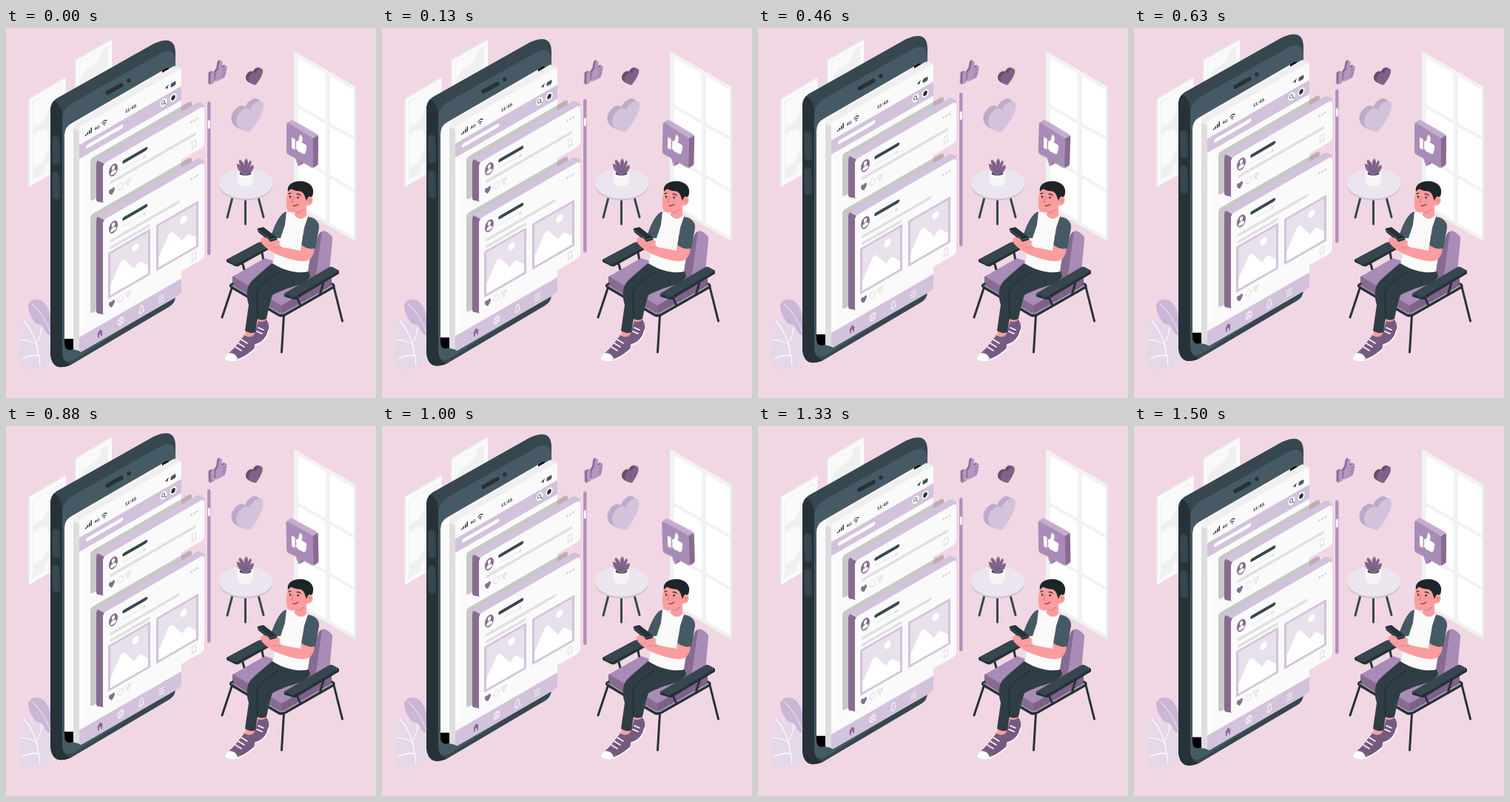
An HTML page that plays this animation: 500x500 px, repeating every 1540 ms.

```html
<!DOCTYPE html>
<html lang="en">
<head>
<meta charset="utf-8">
<title>Social feed</title>
<style>
html, body { margin: 0; width: 100%; height: 100%; overflow: hidden; background: #f1d7e3; }
svg { display: block; width: 100%; height: 100%; }
text { font-family: "Liberation Sans", Arial, sans-serif; font-weight: bold; fill: #263238; }
.float, .bar, .wind { animation: 1540ms linear -60ms infinite; }
.float { animation-name: float; }
.bar { animation-name: bar; }
.wind { animation-name: wind; transform-box: fill-box; transform-origin: center; }
@keyframes float { 0%, 100% { transform: translateY(.8px); } 50% { transform: translateY(-9.2px); } }
@keyframes bar { 0%, 100% { transform: translateY(1.6px); } 50% { transform: translateY(-18.4px); } }
@keyframes wind { 0%, 100% { transform: rotate(0); } 25% { transform: rotate(2.5deg); } 75% { transform: rotate(-2.5deg); } }
.line { fill: none; stroke-linecap: round; stroke-linejoin: round; }
.dark { fill: #263238; }
.slate { fill: #37474f; }
.steel { fill: #455a64; }
.plum { fill: #876b91; }
.mauve { fill: #a98bb7; }
.lilac { fill: #d3c2dc; }
.paper { fill: #fafafa; }
.skin { fill: #fb9d9e; }
</style>
</head>
<body>
<svg viewBox="0 0 500 500">
<defs>
  <path id="heart" d="M0 9C-14 0-10-10-4-9C-1-9 0-6 0-5C0-6 1-9 4-9C10-10 14 0 0 9Z"/>
  <path id="thumb" d="M0 8.500H5V21H0ZM6.500 10.500L10 8L11.500 1.500Q12-.5 14 .5Q16 2 15.500 5L14.500 8.500H20Q22.500 9.500 21 12Q22 14 20.500 15.500Q21 17.500 19.500 18.500Q19 21 17 21H10L6.500 19.500Z"/>
  <g id="head">
    <ellipse class="plum" cx="14" cy="16" rx="6" ry="8"/>
    <ellipse fill="#fff" cx="14" cy="13" rx="2.200" ry="2.900"/>
    <path fill="#fff" d="M10 20.500Q10 16.500 14 16.500Q18 16.500 18 20.500Q14 23.500 10 20.500Z"/>
    <path class="line" stroke="#37474f" stroke-width="4.500" d="M28.500 13H58"/>
    <path class="line" stroke="#e4e4e4" d="M27 22.500H52"/>
    <circle cx="56" cy="22.500" r="2" fill="#e0e0e0"/>
    <g fill="#d2d2d2"><circle cx="119.500" cy="12" r="1.400"/><circle cx="123.500" cy="12" r="1.400"/><circle cx="127.500" cy="12" r="1.400"/></g>
  </g>
  <g id="acts">
    <use href="#heart" class="plum" transform="translate(12) scale(.42 .48)"/>
    <g class="line" stroke="#dcdcdc">
      <ellipse cx="24" rx="3.600" ry="4"/>
      <path d="M30.500-3.500H37.500L34 4.500ZM37.500-3.500L33 0M120.500-5H125.500V5L123 2.500L120.500 5Z"/>
    </g>
  </g>
  <g id="pic">
    <rect width="57" height="62" fill="#e8e0eb"/>
    <path fill="#fff" d="M1 49L17 22Q19 19 22 22L35 41L40 37Q43 35 46 39L56 50V61H1Z"/>
    <ellipse cx="37" cy="14" rx="4.500" ry="5" fill="#fff"/>
    <rect x="1.500" y="1.500" width="54" height="59" fill="none" stroke="#d3c2dc" stroke-width="3"/>
  </g>
</defs>

<rect width="500" height="500" fill="#f1d7e3"/>

<!-- wall pictures -->
<g transform="matrix(1 -.58 0 1 30 97)">
  <path fill="#e8e8e8" d="M0 0L2-2H51V118H0Z"/>
  <rect x="1.500" width="49" height="118" class="paper"/>
  <rect x="6" y="6" width="39" height="106" fill="#f0f0f0"/>
  <path fill="#fafafa" d="M7 7H44V24Q30 20 26 32T10 40L7 41ZM7 52Q22 46 26 58T44 66V84Q30 78 24 88T7 94ZM20 111Q24 98 44 96V111Z"/>
</g>
<g transform="matrix(1 -.58 0 1 93 45)">
  <path fill="#e8e8e8" d="M0 0L2-2H50V118H0Z"/>
  <rect x="1.500" width="48.500" height="118" class="paper"/>
  <rect x="6" y="6" width="39" height="106" fill="#f0f0f0"/>
  <path fill="#fafafa" d="M7 7H36Q34 20 22 20T7 30ZM7 44Q18 34 28 38T44 30V60H7Z"/>
</g>

<!-- window -->
<g transform="matrix(1 .577 0 1 389 31)">
  <path fill="#e2e2e2" d="M0 0H85V210H0Z"/>
  <path fill="#f2f2f2" d="M0 0H83V209H0Z"/>
  <path fill="#fff" d="M5 6H43V69H5ZM48 6H81V69H48ZM5 74H43V139H5ZM48 74H81V139H48ZM5 144H43V204H5ZM48 144H81V204H48Z"/>
  <path class="line" stroke="#ebebeb" d="M5 204V144M5 139V74M5 69V6M48 204V144M48 139V74M48 69V6"/>
</g>

<!-- leaves -->
<path fill="#cab6d6" d="M62 416C44 408 30 390 30 375C33 365 46 364 53 373C60 381 62 396 62 416Z"/>
<path class="line" stroke="#e6dbea" stroke-width="1.200" d="M36 373Q52 388 61 414"/>
<path fill="#e3d9e9" d="M60 452C50 452 44 464 31 463C23 462 20 455 24 449C14 446 13 437 20 433C13 427 14 418 21 416C16 406 19 394 29 393C38 394 40 401 46 401C53 403 52 410 55 414C62 425 61 440 60 452Z"/>
<path class="line" stroke="#fff" stroke-width="1.100" d="M24 396Q42 414 46 456M19 421Q33 422 42 428M22 447Q36 440 45 443M48 405Q47 416 42 424"/>

<!-- phone and feed -->
<g class="float">
  <path class="slate" d="M60 112Q60 98 74 92L200 21Q229 8 229 34V362Q229 372 220 377L88 455Q62 466 60 440Z"/>
  <path class="dark" d="M60 112Q60 103 65 98Q76 104 76 122V438Q76 452 88 455Q62 466 60 440Z"/>
  <path class="steel" d="M76 126Q76 109 90 101L208 35Q229 24 229 48V362L92 448Q76 456 76 436Z"/>
  <g class="slate" stroke="#2f3e46"><rect x="62.500" y="146" width="10" height="39" rx="5" transform="rotate(-2 67 166)"/><rect x="62.500" y="194" width="10" height="38" rx="5" transform="rotate(-2 67 213)"/></g>
  <path class="line" stroke="#263238" stroke-width="5.500" d="M137 87.500L156 77"/>
  <circle class="dark" cx="166" cy="71" r="2.800"/>
  <path d="M79 145Q79 134 88 129L214 56Q222 50 222 62V358L90 434Q79 438 79 425Z"/>
  <path class="paper" d="M79 145Q79 134 88 129L211 57.700V362L91 420H79Z"/>

  <g transform="matrix(1 -.577 0 1 99 0)">
    <path fill="#efefef" d="M-8 132Q-8 125-2 125H128L138 134V150H-8Z"/>
    <path fill="#dedede" d="M-8 131L0 139V435L3 439L-5 432Q-8 431-8 427Z"/>
    <rect y="134" width="138" height="305" rx="4" class="paper"/>
    <path class="lilac" d="M0 158H138V177H0ZM0 418H138V435Q138 439 134 439H4Q0 439 0 435Z"/>
    <path class="dark" d="M8 149H9.500V151H8ZM10.500 147.500H12V151H10.500ZM13 146H14.500V151H13ZM15.500 144H17V151H15.500Z"/>
    <text x="20.500" y="150.500" font-size="5.500">4G</text>
    <g class="line" stroke="#263238" stroke-width="1.200"><path d="M31 146.500Q34 143 37 146.500M32.500 148.700Q34 147 35.500 148.700"/></g>
    <circle class="dark" cx="34" cy="150.500" r=".8"/>
    <text x="62" y="151" font-size="6">11:45</text>
    <path class="dark" d="M115.500 148.500L121 146L118.500 151.500L118 149Z"/>
    <rect x="124" y="147" width="6" height="4.500" rx="1" class="steel" stroke="#37474f" stroke-width=".8"/>
    <path class="line" stroke="#fff" stroke-width="5" d="M11.500 166.500H57"/>
    <ellipse cx="114" cy="166.500" rx="4.500" ry="5.200" fill="#fff"/>
    <ellipse cx="127" cy="167.500" rx="4.500" ry="5.200" fill="#fff"/>
    <ellipse class="dark" cx="127" cy="167.500" rx="2.800" ry="3.300"/>
    <g class="line" stroke="#37474f" stroke-width=".8"><ellipse cx="113.500" cy="166" rx="2" ry="2.300"/><path d="M115 168L117 170"/></g>
    <path class="plum" d="M24 428.500L28 423.500L32 428.500H31V433.500H29.200V430H26.800V433.500H25V428.500Z"/>
    <g class="line" stroke="#fff" stroke-width=".9">
      <ellipse cx="56" cy="428.500" rx="4" ry="4.800"/><ellipse cx="56" cy="427" rx="1.500" ry="1.800"/><path d="M53 432Q56 428.500 59 432"/>
      <path d="M80.500 432.500Q82 430.500 82 427.500Q82 423.500 84 423.500Q86 423.500 86 427.500Q86 430.500 87.500 432.500ZM83 434.500H85M107.500 426H114.500M107.500 429.500H114.500M107.500 433H114.500"/>
    </g>
  </g>

  <g transform="matrix(1 -.577 0 1 131 184)">
    <rect x="-17" y="-17" width="137" height="58" rx="4" opacity=".2"/>
    <path class="lilac" d="M-9-5Q-9-10-4-10H125Q129-10 132-7L137-1V10H-9Z"/>
    <path class="plum" d="M-9-5Q-9-8-7-9L2 1V52L4 55L-5 48Q-9 46-9 42Z"/>
    <rect width="137" height="55" rx="5" class="paper"/>
    <use href="#head"/>
    <path class="line" stroke="#e0e0e0" stroke-width="4" d="M11 31H124"/>
    <use href="#acts" y="44"/>
  </g>

  <g transform="matrix(1 -.577 0 1 131 260)">
    <rect x="-17" y="-17" width="137" height="134" rx="4" opacity=".2"/>
    <path class="lilac" d="M-9-5Q-9-10-4-10H125Q129-10 132-7L137-1V10H-9Z"/>
    <path class="plum" d="M-9-5Q-9-8-7-9L2 1V127L4 130L-5 123Q-9 121-9 117Z"/>
    <rect width="137" height="130" rx="5" class="paper"/>
    <use href="#head" y="1"/>
    <path class="line" stroke="#e0e0e0" stroke-width="4" d="M11 34H102M11 43H62"/>
    <use href="#pic" x="7" y="48"/>
    <use href="#pic" x="72" y="48"/>
    <use href="#acts" y="120"/>
  </g>
</g>

<g class="bar">
  <path class="line" stroke="#b08fbd" stroke-width="4.400" d="M274.300 101.500V304.500"/>
  <path class="line" stroke="#fff" stroke-width="3" d="M274.300 126V134.500"/>
</g>

<!-- reactions -->
<g class="wind">
  <g transform="matrix(1 -.5 0 1.220 274 51)">
    <use href="#thumb" class="plum" transform="translate(-.5 -1) scale(1.050 1)"/>
    <use href="#thumb" class="plum" transform="translate(1 .5) scale(1.050 1)"/>
    <use href="#thumb" fill="#b297c0" transform="translate(2.500 1) scale(1.020 1)"/>
    <path class="line" stroke="#876b91" stroke-width=".8" d="M19 13H24M19 16.500H23M18.500 19.500H22"/>
  </g>
</g>
<g class="wind">
  <use href="#heart" fill="#644b6e" transform="matrix(1 -.55 0 1 333.500 65.500)"/>
  <use href="#heart" fill="#644b6e" transform="matrix(1 -.55 0 1.050 335.500 66.500)"/>
  <use href="#heart" fill="#7d6287" transform="matrix(1 -.55 0 1.050 337.500 67.500)"/>
</g>
<g class="wind">
  <use href="#heart" fill="#bda9c8" transform="matrix(1.950 -1.100 0 1.980 323 119.500)"/>
  <use href="#heart" fill="#bda9c8" transform="matrix(1.950 -1.100 0 1.980 326 121)"/>
  <use href="#heart" class="lilac" transform="matrix(1.950 -1.100 0 1.980 329.500 122.800)"/>
</g>
<g class="wind">
  <path fill="#c4acd0" d="M379 129L384 125Q386 124 388 125L420 143Q422 145 422 147L414 153Z"/>
  <path class="plum" d="M413 150L421.500 145Q422 146 422 148V183Q422 185 420 186L415 189ZM395 187L402 183L400 179Z"/>
  <path class="mauve" d="M379 131Q379 127 382 129L412 147Q415 149 415 152V186Q415 190 412 188L400 181L395 187L391 176L381 171Q379 169 379 167Z"/>
  <use href="#thumb" fill="#fff" transform="matrix(.94 .48 0 1.150 386 138)"/>
</g>

<!-- table -->
<path class="line" stroke="#37474f" stroke-width="3" d="M306 229L299 256M323.500 230V265M341 229L348 255.500"/>
<ellipse cx="324" cy="212" rx="36.500" ry="21" fill="#cfc2d8"/>
<ellipse cx="324" cy="210" rx="36.500" ry="20.500" fill="#ebe5ef"/>
<path fill="#f5f5f5" d="M312.500 196L313.500 209Q316 214 323.500 214Q331 214 333.500 209L334.500 196Z"/>
<ellipse cx="323.500" cy="196" rx="11" ry="5" fill="#fff"/>
<ellipse cx="323.500" cy="196.500" rx="8" ry="3" class="slate"/>
<path class="plum" d="M320 198Q311 191 312 183Q318 185 320 189Q312 181 316 177.500Q320 180 322 185Q321 179 325 176Q328 180 326.500 185Q328 180 331 178.500Q333 184 328 189Q331 185 335 185.500Q335 194 327 198Q323 200 320 198Z"/>
<path class="line" stroke="#694f73" stroke-width=".9" d="M314 185Q318 189 322 197M317 180L323 195M325 180L324 195M331 181L325 195M333 187L326 197"/>

<!-- chair -->
<g class="line" stroke="#263238" stroke-width="3">
  <path d="M307 346L292 391M443 350L454.500 396M375.500 388L372.500 438M319 316L323 330M345 298L349 320"/>
</g>
<path class="mauve" d="M306 336L350 311L440 340L372 378Z"/>
<path class="plum" d="M306 335L372 375V388L306 349Z"/>
<path fill="#7d6187" d="M372 375L440 337V349L372 388Z"/>
<path class="plum" d="M412 306L423 278Q426 273 431 276L437 280L430 334L404 342Z"/>
<path class="mauve" d="M427 275Q431 272 440 281Q442 283 441 286L437 330L418 340Z"/>
<g class="line">
  <path stroke="#263238" stroke-width="3.400" d="M306 346Q301 348 306 351L368 387.500Q372 390 377 387.500L441 351Q445 348 441 346"/>
  <path stroke="#aebbc1" stroke-width="1" d="M305 347.500L369 385.300Q372 387 376 385L441 348"/>
</g>
<path class="dark" d="M298 313L341 290Q344 289 347 290L357 295V298L314 322Q311 323 308 321L298 316Z"/>
<path class="slate" d="M298 313L341 290Q344 289 347 290L357 295L313 318Q310 319 307 318Z"/>

<!-- man -->
<path class="skin" d="M324 405L337 407L335 420L323 418ZM341 392L352 393L351 404L340 402Z"/>
<path fill="#765b80" d="M341 396Q347 399 352 394Q356 400 355 407C354 418 346 427 336 428L334 418Z"/>
<path class="line" stroke="#fff" stroke-width="1.700" d="M355 408Q352 424 336 428.500M341 405L348 408M339 410L346 413"/>
<path fill="#2f3d44" d="M362 316C375 325 392 333 409 329L411 335C409 341 400 346 390 349C379 352 367 357 360 361C356 372 354 384 352 393Q346 396 340 393L337 411Q330 414 323 409L328 374C324 362 325 350 331 343C340 334 352 324 362 316Z"/>
<path class="line" stroke="#1d282d" stroke-width="1" d="M367 331Q348 342 339 356Q339 376 340 393M370 322Q380 329 391 329"/>
<path fill="#765b80" d="M322 415Q330 420 334 415C337 421 337 430 334 436C326 444 316 450 306 449C298 449 296 446 298 442C306 436 315 425 322 415Z"/>
<path fill="#fff" d="M299 440Q309 437 313 447Q299 453 296 446Z"/>
<path class="line" stroke="#fff" stroke-width="2" d="M297 447Q312 455 335 435"/>
<path class="line" stroke="#fff" stroke-width="1.500" d="M318 421L326 426M314 426L322 431M310 431L318 436"/>
<path class="skin" d="M359 277L371 281L368 293L356 291Z"/>
<path class="paper" d="M379 248C386 248 390 252 393 256C400 260 404 258 407 254L416 262L412 300L408 329C392 333 372 326 360 318L367 290L370 262Z"/>
<path class="steel" d="M379 248C371 250 365 262 359 278Q363 284 371 284L377 266ZM408 255C418 256 424 263 423 270L418 298Q408 301 399 294L403 270Z"/>
<path class="skin" d="M399 293Q408 300 417 298C416 307 412 314 404 315C392 316 372 309 362 304C354 299 346 294 344 287C346 281 352 280 358 286C364 289 369 291 372 296L398 301Z"/>
<path class="line" stroke="#e57f80" d="M372 297Q366 299 361 296M349 288L356 294"/>
<path class="dark" d="M340 273Q339 271 341 270.500L348 269L366 283Q367 286 364 287L357 289L341 276Z"/>
<path class="line" stroke="#52646d" d="M341 273L357 286L365 284"/>
<path class="skin" d="M345 286Q350 280 355 286L359 292L352 295ZM362 290Q368 283 370 289L369 296L363 296Z"/>
<path class="skin" d="M381 219C380 228 377 236 380 245C382 250 388 249 391 249L390 253C396 260 404 258 406 252V240C412 241 416 235 414 230C412 226 408 229 407 231L402 221L385 216Z"/>
<path fill="#1d2528" d="M381 221C379 212 388 206.500 398 207C410 207 416.500 215 415 223Q414.500 229 412 228C409 227 407 230 406 234L404 228Q402 221 397 220.500Q390 220 385 217.500Z"/>
<g class="line" stroke="#1d2528" stroke-width="1.200"><path d="M381.500 224L385 223M393 224.500Q396 224 398 226"/></g>
<ellipse class="dark" cx="384" cy="228" rx="1.100" ry="1.700"/>
<ellipse class="dark" cx="394.500" cy="229" rx="1.100" ry="1.700"/>
<path class="line" stroke="#e57375" stroke-width="1.100" d="M388 228L386 235L389 235.500M409 232Q412 231 411 236M392 250Q399 249 402 245"/>
<path class="line" stroke="#8f3f48" stroke-width="1.300" d="M388 240Q392 241 395 238"/>

<!-- near armrest -->
<path class="line" stroke="#263238" stroke-width="3" d="M429 344L424 361M393 364L398 375"/>
<path class="dark" d="M376 359L434 325Q438 322 441 323L450 328V332L393 366Q389 368 386 366L376 363Z"/>
<path class="slate" d="M376 359L434 325Q438 322 441 323L450 328L392 362Q389 364 386 363Z"/>
</svg>
</body>
</html>
```
